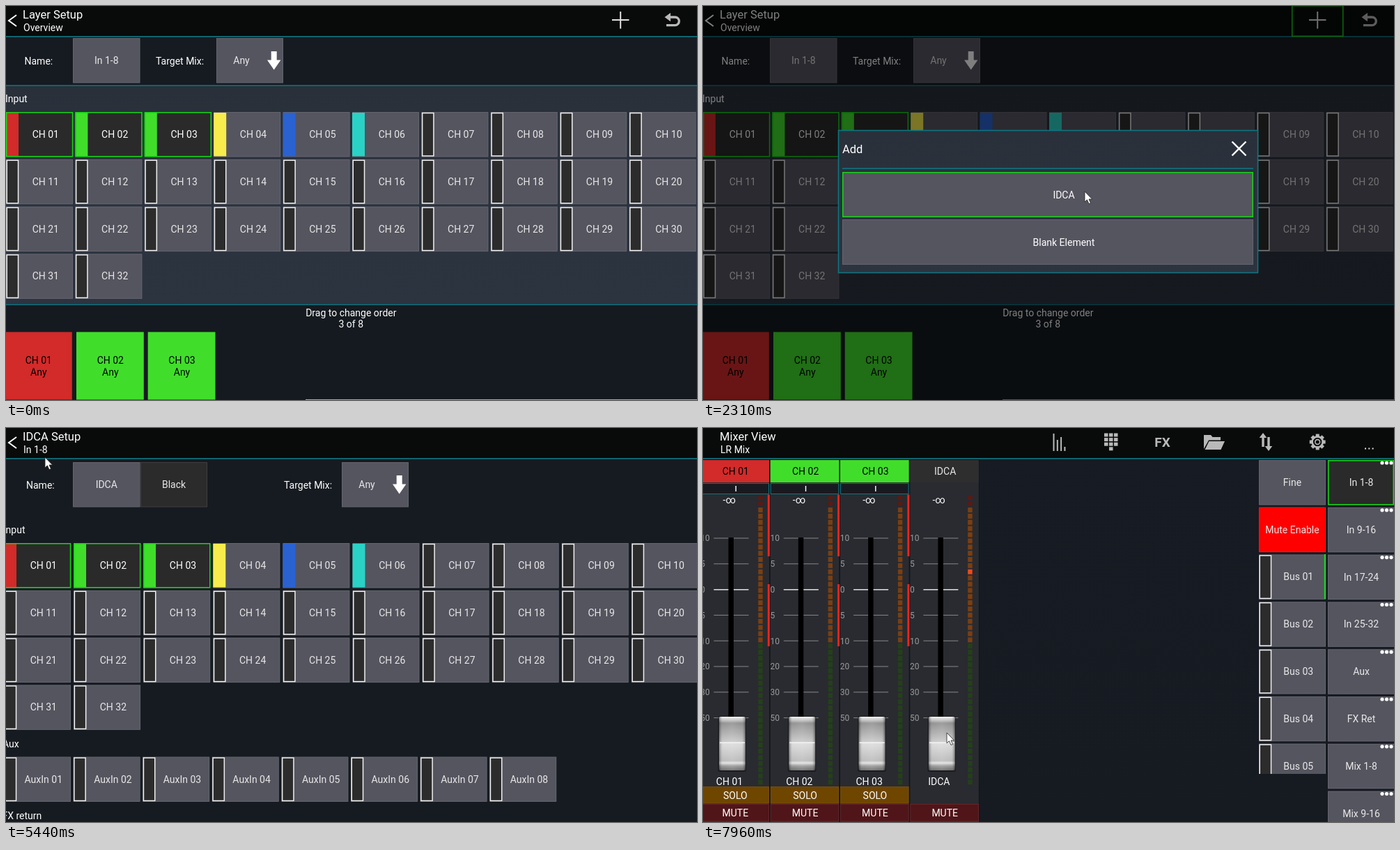
Write an HTML page that moves like this. It is 992 by 565 pixels and loops after 8 s.

```html
<!DOCTYPE html>
<html lang="en">
<head>
<meta charset="utf-8">
<title>Layer setup</title>
<style>
  html, body { margin: 0; width: 100%; height: 100%; overflow: hidden; background: #161b21; }
  svg { display: block; width: 992px; height: 565px; }
  text { font: 14px Roboto, sans-serif; fill: #e8e8e8; white-space: pre; }
  .title { font-size: 16.5px; fill: #fff; }
  .mid { text-anchor: middle; }
  .white { fill: #fff; }
  .dark { fill: #000; }
  .scale { font-size: 12px; fill: #9a9a9a; }
  .fx { font-size: 19px; font-weight: 700; fill: #b9b9b9; }
</style>
</head>
<body>
<svg id="stage" viewBox="0 0 992 565" xmlns="http://www.w3.org/2000/svg"></svg>
<script>
const BTN = '#555560', DARK = '#2b2b2b', TEAL = '#0f7480', GREEN = '#14d814', ICON = '#b9b9b9';
const RED = '#d32a2a', LIME = '#40de2a';
const STRIPS = [RED, LIME, LIME, '#f8ec4c', '#2a62d2', '#2ad2c6'];
const ROW = 67.8;

const range = (n, fn) => Array.from({ length: n }, (_, i) => fn(i)).join('');
const pad = n => String(n).padStart(2, '0');
const rect = (x, y, w, h, fill, extra = '') =>
  `<rect x="${x}" y="${y}" width="${w}" height="${h}" fill="${fill}" ${extra}/>`;
const frame = (x, y, w, h, color, id = '') =>
  rect(x + .75, y + .75, w - 1.5, h - 1.5, 'none', `stroke="${color}" stroke-width="1.5" ${id && `id="${id}"`}`);
const path = (d, fill, stroke = 'none', width = 1) =>
  `<path d="${d}" fill="${fill}" stroke="${stroke}" stroke-width="${width}"/>`;
// y is the middle of the capital letters
const text = (x, y, s, cls = '') => `<text x="${x}" y="${y + 5}" class="${cls}">${s}</text>`;
const mid = (x, y, s, cls = '') => text(x, y, s, 'mid ' + cls);
const group = (id, body) => `<g id="${id}">${body}</g>`;

const button = (x, y, w, h, label, fill = BTN) =>
  rect(x, y, w, h, fill) +
  rect(x + .5, y + .5, w - 1, h - 1, 'none', 'stroke="#fff" stroke-opacity=".09"') +
  mid(x + w / 2, y + 32, label);

const strip = (x, y, color) => color
  ? rect(x, y + 1, 18, 62.5, color)
  : rect(x + 1.25, y + 1.5, 16.3, 61.5, '#2c2c2c', 'stroke="#f0f0f0" stroke-width="1.5"');

const cell = (x, y, label, color, picked) =>
  button(x, y, 96, 64.5, '', picked ? '#2a2a2a' : BTN) + strip(x, y, color) +
  mid(x + 56.8, y + 32, label, picked ? 'white' : '') +
  (picked ? frame(x, y, 96.3, 64.5, GREEN) : '');

const channels = (x, y, pitch, picked) => range(32, i =>
  cell(x + (i % 10) * pitch, y + Math.floor(i / 10) * ROW, 'CH ' + pad(i + 1), STRIPS[i], i < picked));

const header = (title, sub, back = true) =>
  rect(0, 0, 992, 43, '#090a0a') + rect(0, 43, 992, 1.6, TEAL) +
  (back ? path('M15 13L4 21L15 29', 'none', '#fff', 2) : '') +
  text(24, 12.7, title, 'title') + text(25, 30.8, sub, 'white');

const downArrow = (x, y) =>
  path(`M${x - 4} ${y}h8v12.5h5.7L${x} ${y + 26.5}l-9.7-14h5.7z`, '#fff');

const target = (label, x, y) =>
  text(label, y + .5, 'Target Mix:', 'white') + button(x, y - 32, 96, 64.5, '') +
  mid(x + 36, y, 'Any') + downArrow(x + 82.7, y - 13);

function layerScreen(count) {
  const slots = ['CH 01', 'CH 02', 'CH 03', 'IDCA'].slice(0, count);
  return rect(0, 0, 992, 565, '#161b21') + header('Layer Setup', 'Overview') +
    path('M870 20H894.5M882.2 8V32.5', 'none', '#e0e0e0', 2) +
    path('M953 16H960.5a5.8 5.8 0 0 1 0 11.6H948', 'none', ICON, 3.3) +
    path('M945.5 16L954 9.7V22.3z', ICON) +
    text(26.5, 78.5, 'Name:', 'white') + button(96, 46, 96.5, 64.5, 'In 1-8') + target(215, 302, 78) +
    rect(0, 113.3, 992, 1.6, TEAL) + rect(0, 115, 992, 312.5, 'url(#panel)') +
    text(-1, 133, 'Input', 'white') + channels(0, 152, 99.4, 3) +
    rect(0, 427.5, 992, 1.6, TEAL) + rect(0, 429, 992, 136, '#151a20') +
    mid(495.3, 440, 'Drag to change order', 'white') + mid(495.3, 456.3, count + ' of 8', 'white') +
    slots.map((s, i) => {
      const x = i ? 101 + (i - 1) * 102.7 : -2, cls = i < 3 ? 'dark' : 'white';
      return rect(x, 467.5, 96.8, 97, [RED, LIME, LIME, DARK][i]) +
        mid(x + 48.8, 508, s, cls) + mid(x + 48.8, 524.7, 'Any', cls);
    }).join('');
}

function idcaScreen() {
  return rect(0, 0, 992, 565, '#161b21') + header('IDCA Setup', 'In 1-8') +
    text(29, 81.5, 'Name:', 'white') + button(96, 49, 96.5, 64.5, 'IDCA') +
    button(193, 49, 96, 64.5, 'Black', DARK) + target(399, 482, 81) +
    text(-4.2, 146, 'Input', 'white') + channels(-3, 165, 100.1, 0) +
    range(3, i => {
      const x = -3 + i * 100.1;
      return group('dark' + i, rect(x + 18, 165, 78, 64.5, '#2a2a2a') +
        mid(x + 56.8, 197, 'CH ' + pad(i + 1), 'white')) + frame(x, 165, 96.3, 64.5, GREEN, 'edge' + i);
    }) +
    text(-5, 453, 'Aux', 'white') +
    range(8, i => cell(-3 + i * 99.6, 471.5, 'AuxIn ' + pad(i + 1))) +
    text(-5.5, 556, 'FX return', 'white') +
    rect(990.5, 129, 1.5, 191, '#9aa0a4', 'id="thumb"');
}

function dialog() {
  return rect(194.5, 178.5, 602, 204, 'url(#panel)', `stroke="${TEAL}" stroke-width="1.6"`) +
    text(200, 206, 'Add', 'title') + path('M759.5 194.5L779.5 214.5M779.5 194.5L759.5 214.5', 'none', '#fff', 2.4) +
    rect(200, 232.2, 590, 1.6, TEAL) +
    button(200, 238, 590, 65, '') + mid(518, 271, 'IDCA', 'white') +
    button(200, 306, 590, 65, '') + mid(518, 338.5, 'Blank Element', 'white') +
    frame(200, 238, 590, 65, GREEN, 'pick');
}

function icons() {
  const teeth = range(8, i => rect(879.7, 8.6, 5, 5, ICON, `transform="rotate(${i * 45} 882.2 20)"`));
  return [8, 17, 13, 27].map((y, i) => rect(502.5 + i * 5.3, y, 2, 33 - y, ICON)).join('') +
    range(10, i => rect(i < 9 ? 576 + (i % 3) * 7 : 583, 7.5 + Math.floor(i / 3) * 6.6, 5.5, 5, ICON)) +
    mid(659.5, 21.8, 'FX', 'fx') +
    path('M719 30V10h10l2.5 3H743v4.5H726z', ICON) + path('M726.5 19H749L743.5 31H720.5z', ICON) +
    path('M804 7l5.3 7h-3.6v13h-3.4V14h-3.6zM812 33l5.3-7h-3.6V13h-3.4v13h-3.6z', ICON) +
    teeth + `<circle cx="882.2" cy="20" r="7.6" fill="none" stroke="${ICON}" stroke-width="2.6"/>` +
    `<circle cx="882.2" cy="20" r="3.4" fill="none" stroke="${ICON}" stroke-width="1.6"/>` +
    range(3, i => rect(950 + i * 5.3, 28.5, 2, 2, '#ddd'));
}

function fader(i) {
  const x = i * 100.3, left = i ? x - 3.6 : -4, w = i ? 98.6 : 99, idca = i === 3;
  const name = idca ? 'IDCA' : 'CH ' + pad(i + 1);
  const meter = range(47, k => rect(x + 79.3, 96.3 + k * 8.87, 6.4, 7,
    idca && k === 12 ? '#f0491c' : k < 2 ? '#5a1a14' : k < 24 ? '#7a3f12' : '#24401a'));
  const scale = [10, 5, 0, 5, 10, 20, 30, 50].map((v, k) => {
    const y = 158 + k * 36.8;
    return rect(x + 15.5, y - .5, 50, v ? 1 : 1.4, v ? '#85878a' : '#f0f0f0') +
      `<text x="${x - 3.8}" y="${y + 4.3}" class="scale">${v}</text>`;
  }).join('');
  return rect(left, 46, w, 519, '#292b30') +
    rect(left, 46, w, 32, idca ? '#2e2e2f' : STRIPS[i]) + mid(x + 46.8, 62, name, idca ? '' : 'dark') +
    (idca ? '' : rect(left + .5, 79.5, w - 1, 15, '#171b21', `stroke="${TEAL}"`) + rect(x + 46.5, 83, 1.4, 8, '#fff')) +
    mid(x + 37.7, 103, '-∞', 'white') + scale + rect(x + 36.5, 157, 7.5, 260, '#000') + meter +
    rect(x + 21.5, 413, 40.5, 80, '#000', 'opacity=".35" rx="2"') +
    rect(x + 23, 414, 37.8, 77, 'url(#knob)', 'rx="2"') + rect(x + 23, 414, 37.8, 77, 'url(#shade)', 'rx="2"') +
    rect(x + 24, 450.5, 36, 1.5, '#f4f4f4') +
    mid(x + 38, 507, name, 'white') +
    (idca ? '' : rect(left + .5, 514.5, w - 1, 23.5, '#6f4600', 'stroke="#8a5a10" stroke-width=".6"') + mid(x + 46.3, 526.8, 'SOLO', 'white') +
      rect(x + 92.8, 95.5, 3, 88.5, '#f0241a') + rect(x + 92.8, 224, 3, 89, '#f0241a')) +
    rect(left + .5, 539.5, w - 1, 24.5, '#501518', 'stroke="#6c2a2c" stroke-width=".8"') + mid(x + 46.3, 551.5, 'MUTE', 'white');
}

function mixerScreen() {
  const layers = ['In 1-8', 'In 9-16', 'In 17-24', 'In 25-32', 'Aux', 'FX Ret', 'Mix 1-8', 'Mix 9-16'];
  return rect(0, 0, 992, 565, 'url(#desk)') + rect(0, 45, 397, 520, '#131519') + range(4, fader) +
    header('Mixer View', 'LR Mix', false) + icons() +
    button(798, 46, 96, 64.5, 'Fine') + button(798, 113.6, 96, 64.5, 'Mute Enable', '#fe0000') +
    `<g clip-path="url(#busClip)">${range(5, i => cell(798, 181.4 + i * ROW, 'Bus ' + pad(i + 1)))}</g>` +
    rect(891.8, 181, 2.4, 64, '#1fd02a') +
    layers.map((s, i) => button(897, 46 + i * ROW, 96, 64.5, s, i ? BTN : '#2a2a2a') +
      (i ? '' : frame(897, 46, 95, 64.5, GREEN)) +
      range(3, k => `<circle cx="${975 + k * 6.5}" cy="${50 + i * ROW}" r="2.6" fill="#fff"/>`)).join('');
}

const gradient = (id, dir, stops) => `<linearGradient id="${id}" ${dir}>` +
  stops.map(([o, c, a = 1]) => `<stop offset="${o}" stop-color="${c}" stop-opacity="${a}"/>`).join('') + '</linearGradient>';
const DOWN = 'x1="0" y1="0" x2="0" y2="1"';

const stage = document.getElementById('stage');
stage.innerHTML = `<defs>
  ${gradient('panel', DOWN, [[0, '#29303a'], [1, '#2c3440']])}
  ${gradient('desk', DOWN, [[0, '#171b23'], [1, '#161a21']])}
  ${gradient('knob', DOWN, [[0, '#f0f0f0'], [.07, '#b8b8b8'], [.12, '#858585'], [.46, '#c2c2c2'], [.5, '#d8d8d8'],
    [.82, '#b4b4b4'], [.86, '#e0e0e0'], [.92, '#8c8c8c'], [1, '#5c5c5c']])}
  ${gradient('shade', '', [[0, '#000', .4], [.14, '#fff', .12], [.5, '#fff', .2], [.86, '#fff', .1], [1, '#000', .4]])}
  <clipPath id="busClip"><rect x="798" y="181" width="97" height="315"/></clipPath></defs>` +
  group('before', layerScreen(3) + rect(430, 564, 562, 1, '#aaa6b2') + frame(845, -1, 74.5, 45, GREEN, 'plus')) +
  group('dim', rect(0, 0, 992, 565, '#000')) +
  group('dialog', dialog()) +
  group('idca', idcaScreen()) +
  group('after', layerScreen(4) + rect(988, 116, 2.6, 97, '#1fd02a', 'id="bar"')) +
  frame(-1, -1, 152.5, 45, GREEN, 'back') +
  group('mixer', mixerScreen()) +
  group('cursor', path('M0 0V15L3.4 11.8L6 17.6L8.5 16.5L6 11H10.6z', '#fff', '#222', .8));

const el = {};
stage.querySelectorAll('g[id], rect[id]').forEach(e => el[e.id] = e);

// opacity per element: [time, value] steps, 0 before the first
const FADES = {
  plus: [[1080, 1]],
  dim: [[1150, .2], [1230, .4], [1300, .5]],
  dialog: [[1150, .4], [1230, .8], [1300, 1]],
  pick: [[2310, 1]],
  idca: [[2460, .6], [2540, 1]],
  thumb: [[2460, 1], [2870, .7], [2950, .4], [3030, .15], [3100, 0]],
  edge0: [[3560, 1]], dark0: [[3710, 1]],
  edge1: [[4110, 1]], dark1: [[4270, 1]],
  edge2: [[4820, 1]], dark2: [[4900, 1]],
  back: [[5600, 1]],
  after: [[5830, .5], [5910, .9], [5990, 1]],
  bar: [[6060, .6], [6140, 1]],
  mixer: [[7010, .6], [7080, 1]],
  cursor: [[200, 1]]
};

// cursor moves: first step, last step, number of steps, end point
const START = [790, 575];
const MOVES = [
  [200, 1000, 11, 880, 41], [1080, 1080, 1, 879, 28], [1540, 2240, 10, 548, 266],
  [2870, 3480, 9, 44, 203], [3710, 4040, 5, 144, 199], [4270, 4740, 7, 256, 193],
  [5280, 5440, 3, 56, 42], [5520, 5600, 2, 39, 22], [6380, 6610, 4, 47, 23], [6850, 6850, 1, 47, 25],
  [7480, 7960, 7, 350, 437]
];

const smooth = p => p * p * (3 - 2 * p);

function cursorAt(t) {
  let [x, y] = START;
  for (const [from, to, n, ex, ey] of MOVES) {
    if (t < from) break;
    const k = t >= to ? n : Math.floor((t - from) / (to - from) * (n - 1)) + 1;
    const p = smooth(k / n);
    x += (ex - x) * p;
    y += (ey - y) * p;
  }
  return [x, y];
}

function draw(t) {
  for (const id in FADES) {
    const step = FADES[id].filter(s => s[0] <= t).pop();
    const v = step ? step[1] : 0;
    el[id].style.display = v ? '' : 'none';
    el[id].style.opacity = v;
  }
  el.cursor.setAttribute('transform', `translate(${cursorAt(t).map(v => v.toFixed(1))})`);
}

const begin = performance.now();
function tick() {
  draw((performance.now() - begin) % 8000);
  requestAnimationFrame(tick);
}
tick();
</script>
</body>
</html>
```
